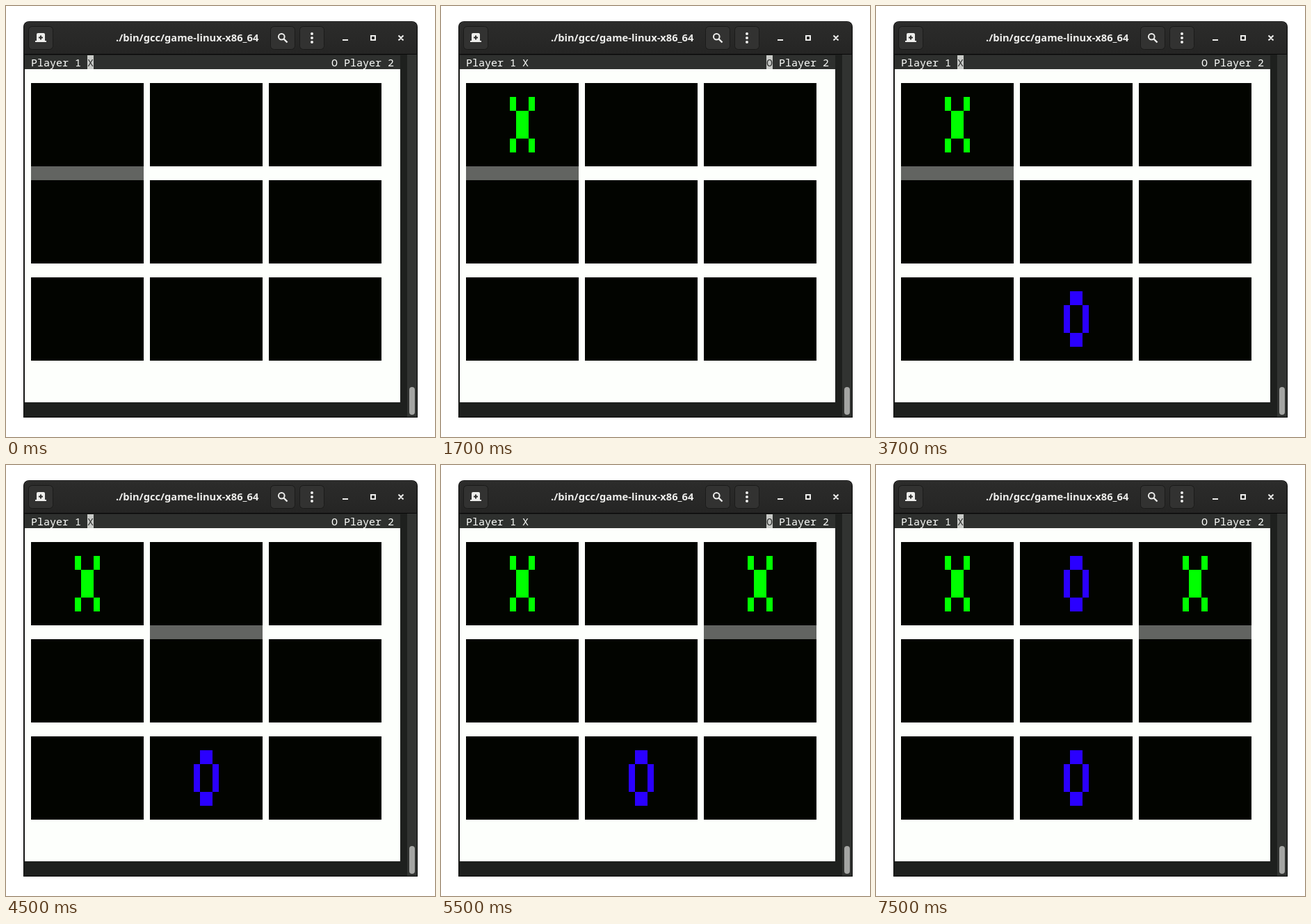
An HTML page for the animation above (8000 ms loop, 617 by 621 pixels).

```html
<!DOCTYPE html>
<html lang="en">
<head>
<meta charset="utf-8">
<title>Noughts and crosses</title>
<style>
  html, body { margin: 0; width: 100%; height: 100%; overflow: hidden; background: #fff; }
  svg { display: block; }
  .title { font: bold 14.667px "Noto Sans", sans-serif; fill: #eeeeec; text-anchor: middle; }
  .status { font: 15px "Noto Sans Mono", monospace; fill: #fdfffc; white-space: pre; }
  .button { fill: #323231; stroke: #1b1b1a; }
  .icon { fill: none; stroke: #eeeeec; stroke-width: 2; }
  .solid { fill: #eeeeec; }
</style>
</head>
<body>
<svg width="617" height="621" viewBox="0 0 617 621">
  <defs>
    <linearGradient id="bar" x2="0" y2="1">
      <stop stop-color="#2c2c2b"/><stop offset="1" stop-color="#252524"/>
    </linearGradient>
    <path id="X" fill="#00ff00" d="M63 20h9v20h18v-20h9v20h-9v40h9v20h-9v-20h-18v20h-9v-20h9v-40h-9z"/>
    <path id="O" fill="#2a00ff" d="M72 20h18v20h9v40h-9v20h-18v-20h-9v-40h9zM72 40v40h18v-40z"/>
  </defs>

  <!-- window -->
  <path fill="#070707" d="M25 593V30a8 8 0 0 1 8-8H584a8 8 0 0 1 8 8V593z"/>
  <path fill="url(#bar)" d="M26 69V30.500a7.500 7.500 0 0 1 7.500-7.500H583.500a7.500 7.500 0 0 1 7.500 7.500V69z"/>
  <path fill="none" stroke="#383837" d="M27 28a6 6 0 0 1 6-4.500H584a6 6 0 0 1 6 4.500"/>
  <rect x="26" y="70" width="565" height="522" fill="#1e201e"/>
  <rect x="577" y="70" width="14" height="522" fill="#313331"/>
  <rect x="580" y="549" width="8" height="40" rx="4" fill="#a4a5a3"/>

  <!-- title bar -->
  <g class="button">
    <rect x="32.500" y="29.500" width="35" height="33" rx="5"/>
    <rect x="380.500" y="29.500" width="35" height="33" rx="5"/>
    <rect x="422.500" y="29.500" width="35" height="33" rx="5"/>
  </g>
  <path class="solid" d="M42 50h2v-9a2 2 0 0 1 2-2h8a2 2 0 0 1 2 2v9h2v2h-16z"/>
  <path d="M47 45.500h6M50 42.500v6" stroke="#323231" stroke-width="2"/>
  <text class="title" x="260.700" y="51">./bin/gcc/game-linux-x86_64</text>
  <g class="icon">
    <circle cx="396.300" cy="44.300" r="4.300"/>
    <path d="M399.500 47.500l5 5" stroke-width="2.400"/>
    <path d="M484 49h8M525 43h6v6h-6zM564.500 42.500l7 7m0-7l-7 7"/>
  </g>
  <g class="solid">
    <circle cx="440" cy="40" r="2"/><circle cx="440" cy="46" r="2"/><circle cx="440" cy="52" r="2"/>
  </g>

  <!-- terminal -->
  <rect x="27" y="71" width="540" height="20" fill="#2e302e"/>
  <rect id="turn" y="71" width="9" height="20" fill="#c8cac7"/>
  <g class="status">
    <text x="36" y="87">Player 1 <tspan id="markX">X</tspan></text>
    <text x="468" y="87"><tspan id="markO">O</tspan> Player 2</text>
  </g>
  <rect x="27" y="91" width="540" height="480" fill="#fdfffc"/>
  <g id="board"></g>
  <rect id="cursor" y="231" width="162" height="20" fill="#626461"/>
</svg>
<script>
const LOOP = 8000;
const moves = [[500, 0], [2500, 7], [5500, 2], [7500, 1]];  // time, cell
const cursorSteps = [4500, 5000];

const el = id => document.getElementById(id);
const columnX = column => 36 + 171 * column;
const place = cell => `translate(${columnX(cell % 3)} ${111 + 140 * Math.floor(cell / 3)})`;

let board = "";
for (let cell = 0; cell < 9; cell++)
  board += `<rect width="162" height="120" fill="#020400" transform="${place(cell)}"/>`;
moves.forEach(([, cell], i) => {
  board += `<use id="move${i}" href="#${"XO"[i % 2]}" transform="${place(cell)}"/>`;
});
el("board").innerHTML = board;

function draw(time) {
  const t = time % LOOP;
  const played = moves.filter(([at]) => t >= at).length;
  const turnO = played % 2 === 1;
  moves.forEach((_, i) => el("move" + i).setAttribute("visibility", i < played ? "visible" : "hidden"));
  el("cursor").setAttribute("x", columnX(cursorSteps.filter(at => t >= at).length));
  el("turn").setAttribute("x", turnO ? 468 : 117);
  el("markX").style.fill = turnO ? "" : "#2e302e";
  el("markO").style.fill = turnO ? "#2e302e" : "";
}

let start;
function tick(now) {
  start ??= now;
  draw(now - start);
  requestAnimationFrame(tick);
}
draw(0);
requestAnimationFrame(tick);
</script>
</body>
</html>
```
